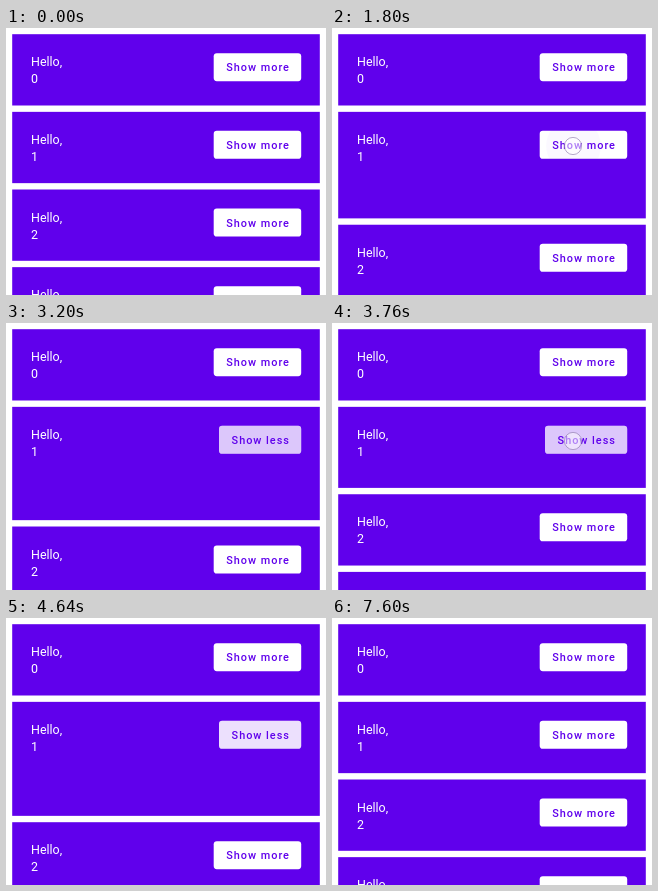
Recreate the animation shown at these times as an HTML page. Size 320 by 267 pixels, loop 7.68 s.

```html
<!DOCTYPE html>
<html lang="en">
<head>
<meta charset="utf-8">
<title>Expanding list cards</title>
<style>
  html, body { margin: 0; width: 100%; height: 100%; overflow: hidden; background: #fff; }
  svg { display: block; width: 100%; height: 100%; }
  text { font-family: Roboto, Arial, sans-serif; }
  .body { font-size: 12.46px; fill: #fff; }
  .label { font-size: 10.9px; font-weight: 500; letter-spacing: .97px; fill: #6000ec; }
</style>
</head>
<body>
<svg id="stage" viewBox="0 0 320 267"></svg>
<script>
const LOOP = 7680;
const PURPLE = '#6000ec';
const PITCH = 77.65, TOP = 6.2, HEIGHT = 71.3, EXTRA = 37.4;
const BUTTON = { right: 295.2, top: 19, height: 28 };
const LABELS = {
  more: { text: 'Show more', x: 220.3, left: 207.7 },
  less: { text: 'Show less', x: 225.6, left: 213 }
};
const TOUCH = { x: 241, y: 118 };

// Each tap toggles the card; lead is how long the ripple starts before the click.
const TAPS = [
  [200, 20], [740, 20], [1270, 20], [1782, -10], [2210, 20], [2652, 10],
  [3000, 20], [3350, 20], [3700, 130], [4050, 40], [4428, 78], [6195, 50]
].map(([time, lead]) => ({ time, start: time - lead }));

const stage = document.getElementById('stage');

function add(parent, tag, attrs, text) {
  const node = document.createElementNS('http://www.w3.org/2000/svg', tag);
  set(node, attrs);
  if (text !== undefined) node.textContent = text;
  return parent.appendChild(node);
}

function set(node, attrs) {
  for (const key in attrs) node.setAttribute(key, attrs[key]);
}

function buttonBox(left) {
  return { x: left, y: BUTTON.top, width: BUTTON.right - left, height: BUTTON.height, rx: 3.1 };
}

function makeCard(index) {
  const group = add(stage, 'g', { transform: `translate(0 ${TOP + index * PITCH})` });
  const panel = add(group, 'rect', { x: 6.2, width: 307.6, height: HEIGHT, fill: PURPLE });
  add(group, 'text', { class: 'body', x: 25, y: 32.2 }, 'Hello,');
  add(group, 'text', { class: 'body', x: 25, y: 49.2 }, index);
  const button = add(group, 'rect', { ...buttonBox(LABELS.more.left), fill: '#fff' });
  const ripples = add(group, 'g', {});
  const label = add(group, 'text', { class: 'label', x: LABELS.more.x, y: 37.1 }, LABELS.more.text);
  return { group, panel, button, ripples, label };
}

const cards = [0, 1, 2, 3].map(makeCard);
const active = cards[1];
const activeTop = TOP + PITCH;

const clip = add(add(stage, 'clipPath', { id: 'buttonClip' }), 'rect', buttonBox(LABELS.more.left));
set(active.ripples, { 'clip-path': 'url(#buttonClip)' });
const ripples = TAPS.map(() => add(active.ripples, 'circle', { fill: PURPLE }));
const pointer = add(stage, 'circle', {
  cx: TOUCH.x, cy: TOUCH.y, r: 8.6, fill: '#fff', 'fill-opacity': .5,
  stroke: '#8f7cab', 'stroke-opacity': .7, 'stroke-width': .9
});

const clamp = v => Math.max(0, Math.min(1, v));
const ease = p => p * p * (3 - 2 * p) * .5 + (1 - (1 - p) ** 2.6) * .5;

// Medium-bouncy, low-stiffness spring: damping ratio 0.5, stiffness 200.
const OMEGA = Math.sqrt(200), DECAY = OMEGA / 2, FREQ = OMEGA * Math.sqrt(.75);

function spring(state, target, seconds) {
  const a = state.x - target;
  const b = (state.v + DECAY * a) / FREQ;
  const e = Math.exp(-DECAY * seconds);
  const c = Math.cos(FREQ * seconds), s = Math.sin(FREQ * seconds);
  return {
    x: target + e * (a * c + b * s),
    v: e * ((b * FREQ - a * DECAY) * c - (a * FREQ + b * DECAY) * s)
  };
}

function cardState(t) {
  let state = { x: 0, v: 0 }, open = false, last = 0;
  for (const { time } of TAPS) {
    if (time > t) break;
    state = spring(state, +open, (time - last) / 1000);
    open = !open;
    last = time;
  }
  return { open, x: Math.max(0, spring(state, +open, (t - last) / 1000).x) };
}

function drawRipple(node, tap, t, left) {
  const age = t - tap.start;
  const fadeStart = Math.max(tap.start + 225, tap.time);
  const alpha = .22 * clamp(age / 75) * (1 - clamp((t - fadeStart) / 150));
  const grow = ease(clamp(age / 225));
  const centerX = (left + BUTTON.right) / 2;
  const centerY = BUTTON.top + BUTTON.height / 2;
  const touchY = TOUCH.y - activeTop;
  set(node, {
    cx: TOUCH.x + (centerX - TOUCH.x) * grow,
    cy: touchY + (centerY - touchY) * grow,
    r: 26 + 28 * grow,
    opacity: alpha
  });
}

function render(t) {
  const { open, x } = cardState(t);
  const extra = EXTRA * x;
  const label = open ? LABELS.less : LABELS.more;
  set(active.panel, { height: HEIGHT + extra });
  set(active.button, buttonBox(label.left));
  set(clip, buttonBox(label.left));
  set(active.label, { x: label.x });
  active.label.textContent = label.text;
  for (const i of [2, 3]) {
    set(cards[i].group, { transform: `translate(0 ${TOP + i * PITCH + extra})` });
  }
  TAPS.forEach((tap, i) => drawRipple(ripples[i], tap, t, label.left));
  const touching = TAPS.some(tap => t >= Math.min(tap.start, tap.time) - 50 && t < tap.time + 85);
  set(pointer, { opacity: +touching });
}

const begin = performance.now();
function tick() {
  render((performance.now() - begin) % LOOP);
  requestAnimationFrame(tick);
}
render(0);
requestAnimationFrame(tick);
</script>
</body>
</html>
```
